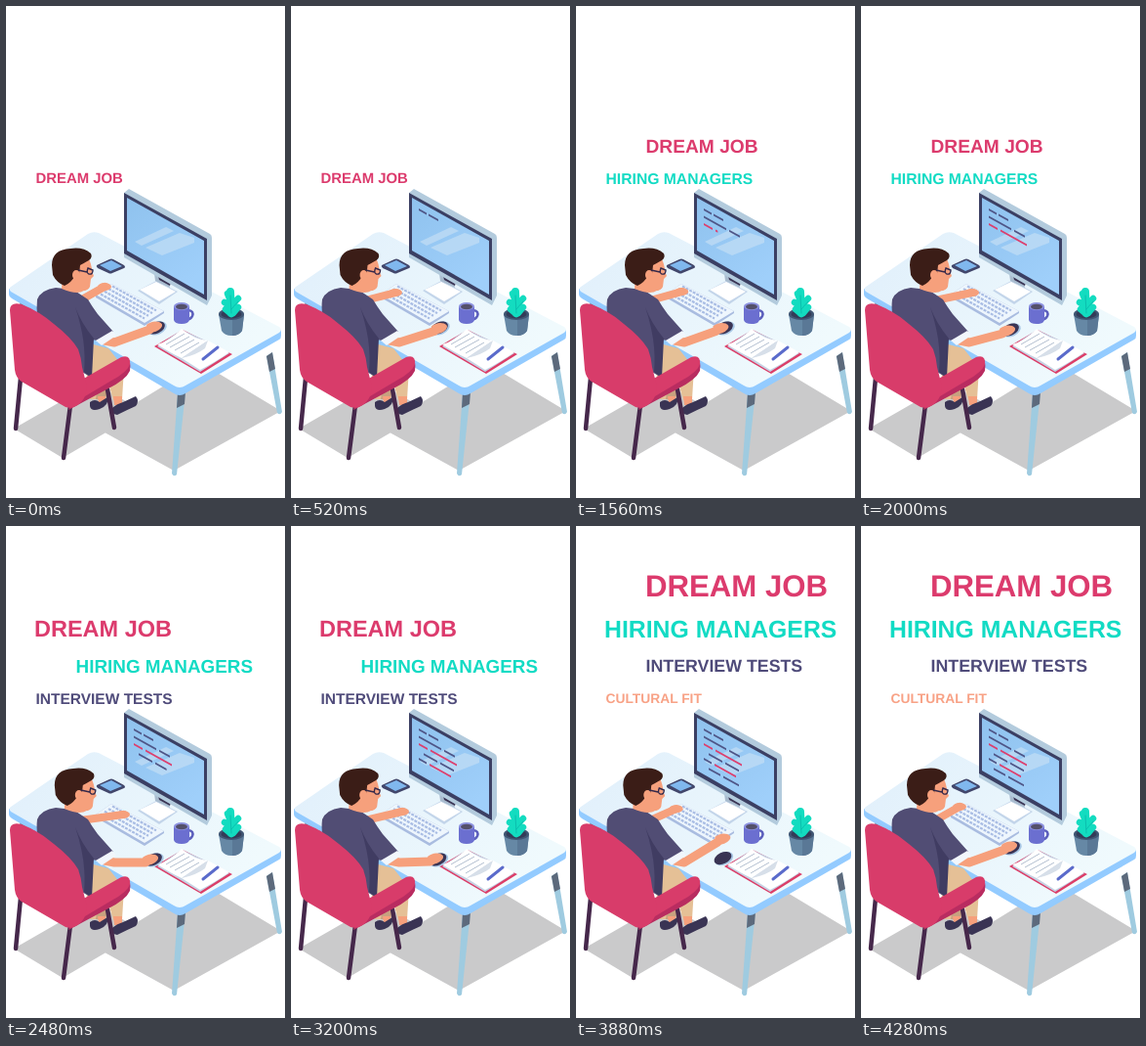
Write an HTML page that moves like this. It is 286 by 503 pixels and loops after 4.32 s.

```html
<!DOCTYPE html>
<html lang="en">
<head>
<meta charset="utf-8">
<title>Dream job</title>
<style>
html, body { margin: 0; width: 100%; height: 100%; overflow: hidden; background: #fff; }
svg { display: block; width: 100%; height: 100%; }
text { font: bold 15px "Liberation Sans", Arial, sans-serif; text-rendering: geometricPrecision; }
.skin { fill: #f6a07c; }
.limb { fill: none; stroke: #f6a07c; stroke-linecap: round; stroke-linejoin: round; }
.dark { fill: #3a3454; }
</style>
</head>
<body>
<svg viewBox="0 0 286 503">
  <defs>
    <linearGradient id="top" x2="1" y2=".5"><stop stop-color="#e0effb"/><stop offset="1" stop-color="#f0fafd"/></linearGradient>
    <linearGradient id="glass" x2=".6" y2="1"><stop stop-color="#8fc2ee"/><stop offset="1" stop-color="#9fcffa"/></linearGradient>
  </defs>

  <g id="labels"></g>

  <!-- shadows and desk -->
  <path fill="#cacacb" d="M8 432L58 462L140 414L90 385ZM92 431L172 475L282 414L200 365Z"/>
  <path fill="#9fcbe0" d="M267 358L273 354L283 415Q281 419 278 416ZM176 395L184 394L175 479Q172 482 170 478Z"/>
  <path fill="#5d6a7c" d="M267 358L273 354L276 371L270 374ZM176 395L184 394L183 407L175 411ZM14 302L21 306L22 318L16 314Z"/>
  <path fill="#93cbff" d="M3 289V295Q3 297 6 299L172 396Q178 400 184 396L280 341Q282 340 282 337V331Z"/>
  <path fill="url(#top)" d="M5 287L84 233Q89 230 95 232L280 328Q284 331 280 334L184 388Q178 392 172 388L5 292Q2 289 5 287Z"/>

  <!-- phone -->
  <path fill="#41466b" d="M93 265L106 259Q108 258 110 259L121 265Q123 267 121 268L109 273Q107 274 105 273L94 268Q92 266 93 265Z"/>
  <path fill="#80b8ee" d="M96 265L108 260L119 266L107 271Z"/>

  <!-- monitor -->
  <path fill="#c3d5ea" d="M135 291L154 281L176 292L157 305Z"/>
  <path fill="#fff" d="M137 290L154 282L174 292L157 302Z"/>
  <path fill="#a9bccf" d="M151 265L166 274L168 288L153 281Z"/>
  <path class="dark" d="M156 276L169 283L168 286L157 280Z"/>
  <path fill="#b3cbdd" d="M121 191L126 187L209 233Q211 234 211 237V296L206 306L121 257Z"/>
  <path fill="#3b3f63" d="M121 191L206 238V301L121 253Z"/>
  <path fill="url(#glass)" d="M124 196L203 240V295L124 250Z"/>
  <path fill="#c4def6" opacity=".7" d="M132 241L164 226L172 230L139 245ZM143 247L178 232L193 237V242L160 255Z"/>
  <g id="code" transform="matrix(1 .55 0 1 131 207)"></g>

  <!-- keyboard -->
  <path fill="#a9bce0" d="M92 295L108 284L162 312V314L142 327L92 298Z"/>
  <path fill="#eef6fd" d="M92 295L108 284L162 312L142 324Z"/>
  <g id="keys" fill="none" stroke="#a9bde4" stroke-width="2.2" stroke-dasharray="3 1.1"></g>

  <!-- mug -->
  <path fill="none" stroke="#5b5fbd" stroke-width="2.5" d="M187 311Q193 312 191 317Q189 321 185 320"/>
  <path fill="#6b6fd0" d="M172 307V321Q173 325 180 325Q187 325 188 321V307Z"/>
  <ellipse cx="180" cy="307" rx="8" ry="4" fill="#8d92e0"/>
  <ellipse cx="180" cy="307.5" rx="6" ry="2.8" fill="#54506a"/>

  <!-- cactus -->
  <path fill="#6688a5" d="M218 315L221 332Q224 337 231 337Q239 337 242 332L244 315Z"/>
  <path fill="#5a7896" d="M232 320L244 316L242 332Q239 337 232 337Z"/>
  <ellipse cx="231" cy="315" rx="13" ry="6" fill="#3f5573"/>
  <ellipse cx="231" cy="315" rx="10.5" ry="4.4" fill="#333c58"/>
  <g fill="none" stroke="#13dcc0" stroke-linecap="round">
    <path stroke-width="8" d="M231 314L230 292"/>
    <path stroke-width="6.5" d="M231 315L225 310M230 306L224 303M233 314L238 308M232 305L238 299M229 299L227 294"/>
    <path stroke="#0bbfae" stroke-width="1" d="M231 314L230 296M231 310L238 302"/>
  </g>

  <!-- notebook -->
  <path fill="#dc3d68" d="M152 348L181 331L232 356L200 376Z"/>
  <path fill="#c6d3e4" d="M155 348L180 331L207 343L229 355L199 374L179 362Z"/>
  <path fill="#fff" d="M155 346Q169 342 180 330Q193 341 207 342L180 360Q169 355 155 346ZM180 360Q195 356 207 342L229 354Q213 365 199 372Z"/>
  <path fill="#d7dfe9" d="M180 360L207 342L204 350Q195 357 180 360Z"/>
  <path fill="none" stroke="#b3bfd0" stroke-width="1" d="M164 346L183 335M168 349L188 338M173 352L193 341M179 355L198 344"/>
  <path stroke="#5a6bcb" stroke-width="3" stroke-linecap="round" d="M202 361L217 349"/>

  <!-- legs and shoes -->
  <path fill="#e5c096" d="M78 343L105 350L121 370L119 402L110 403L104 382L96 402L86 402Z"/>
  <path fill="#c7a280" d="M96 375L106 382L102 403L92 402Z"/>
  <path class="skin" d="M94 399H102V406H95ZM110 399H119V408H111Z"/>
  <path class="dark" d="M86 405Q91 401 96 405L104 400Q106 408 96 412Q87 415 86 409ZM109 411Q113 407 120 405L133 399Q137 404 133 409Q124 413 114 418Q107 417 109 411Z"/>

  <!-- far arm, mouse, near forearm -->
  <path id="farArm" class="limb" stroke-width="8"/>
  <g id="farHand"><ellipse class="skin" rx="7" ry="4"/></g>
  <g id="mouse"><ellipse cx="1" cy="1" rx="10" ry="6.3" transform="rotate(-25)" fill="#a9c8e6"/><ellipse class="dark" rx="9.5" ry="5.8" transform="rotate(-25)"/></g>
  <path id="nearArm" class="limb" stroke-width="9"/>
  <g id="nearHand"><path class="skin" d="M-9 -2Q-3 -7 4 -5Q9 -3 6 1Q2 6 -7 6Z"/></g>

  <!-- torso -->
  <path fill="#514d74" d="M32 300Q36 290 51 288L69 290L84 300Q88 307 94 315L110 333L93 342L88 341L88 380L50 358L37 338Q30 317 32 300Z"/>
  <path fill="#403c62" d="M71 308Q77 324 90 340L88 380L80 374Q83 343 71 308Z"/>
  <path fill="#f1f6fc" d="M92 342L109 332L113 337L98 347Z"/>

  <g id="head">
    <path class="skin" d="M59 275L80 282L81 291Q74 296 58 289ZM66 259L85 257Q89 264 89 271L91 276L88 279L87 287Q85 292 77 291L67 286Z"/>
    <path fill="#3b1d17" d="M48 265Q48 249 67 248Q80 246 88 253Q90 257 86 260Q79 264 77 265L76 274L72 275Q68 283 61 286Q53 283 49 275Z"/>
    <ellipse class="skin" cx="73" cy="275" rx="4" ry="5"/>
    <path fill="none" stroke="#35294a" stroke-width="1.4" d="M75 270L84 272M85 268L90 270Q90 275 86 274Q83 273 85 268Z"/>
  </g>

  <!-- chair -->
  <path fill="none" stroke="#46284b" stroke-width="4.5" stroke-linecap="round" d="M15 380L10 432M66 408L59 462M104 392L111 431"/>
  <path fill="#b92c60" d="M72 386L122 361Q129 362 127 373Q123 382 105 391L64 413Z"/>
  <path fill="#d83c6a" d="M76 383L118 359Q128 356 127 366Q125 374 108 383L76 402Z"/>
  <path fill="#d83c6a" d="M4 311Q4 302 16 305Q34 312 49 325Q67 339 74 351Q77 359 78 369L82 385Q84 398 77 405Q69 413 61 410L16 384Q10 380 9 372Z"/>
</svg>
<script>
const LOOP = 4320, NS = 'http://www.w3.org/2000/svg';
const $ = id => document.getElementById(id);

function add(parent, tag, attrs) {
  const el = document.createElementNS(NS, tag);
  for (const k in attrs) el.setAttribute(k, attrs[k]);
  return $(parent).appendChild(el);
}

// A new label enters below and pushes the earlier ones up a row.
const pushes = [0, 1000, 2120, 3240];
const rows = [176, 143, 105, 61], lefts = [30.5, 71.5, 29, 71];
const labels = [
  ['DREAM JOB', '#dc3b6d', [14.9, 19.2, 23.5, 31.2]],
  ['HIRING MANAGERS', '#12dbc4', [15.7, 18.9, 24.8]],
  ['INTERVIEW TESTS', '#4f4b7a', [15.5, 17.8]],
  ['CULTURAL FIT', '#f8a286', [13.8]]
].map(([word, fill, sizes]) => {
  const el = add('labels', 'text', { fill });
  el.textContent = word;
  return { el, sizes };
});

// Code lines: row, start, length, colour
const ink = '#4f5687', red = '#dc3f6e';
const lines = [
  [0, 0, 8, ink], [0, 10, 10, ink],
  [1, 0, 23, ink], [1, 26, 11, ink],
  [2, 0, 9, red], [2, 12, 27, red],
  [3, 5, 14, ink], [3, 22, 14, ink],
  [4, 0, 8, ink], [4, 11, 22, red],
  [5, 5, 12, ink], [5, 20, 16, ink]
].map(([row, x, len, fill]) => ({
  el: add('code', 'rect', { x, y: row * 7.5, height: 2, fill }),
  len, start: 60 + row * 650 + x * 14
}));

for (let i = 0; i < 4; i++) {
  const x = 97 + i * 4, y = 294.5 - i * 2.7;
  add('keys', 'path', { d: `M${x} ${y}l45 25` });
}

// Poses: time, x, y
const paths = {
  farHand: [[0, 101, 287], [500, 107, 293], [1040, 101, 295], [1500, 108, 292], [2000, 114, 293],
    [2480, 120, 295], [3200, 114, 292], [3520, 104, 291], [4280, 101, 287]],
  nearHand: [[0, 153, 328], [450, 153, 331], [800, 152, 315], [1200, 152, 316], [1650, 149, 331],
    [2000, 151, 332], [2480, 149, 341], [3200, 149, 340], [3460, 151, 319], [3800, 151, 319], [4160, 153, 328]],
  mouse: [[0, 154, 329], [450, 152, 329], [1650, 152, 329], [2000, 153, 331], [2480, 151, 341],
    [3800, 150, 341], [4160, 154, 329]],
  head: [[0, -1, 0], [700, 2, 0], [2000, 2, 0], [3600, 1, 0], [4280, -1, 0]]
};

function pose(keys, t) {
  const i = keys.findLastIndex(k => k[0] <= t);
  const a = keys[i], b = keys[i + 1];
  if (!b) return a.slice(1);
  const p = (1 - Math.cos(Math.PI * (t - a[0]) / (b[0] - a[0]))) / 2;
  return [1, 2].map(n => a[n] + (b[n] - a[n]) * p);
}

function draw(now) {
  const t = Math.floor(now % LOOP / 40) * 40;
  const stage = pushes.filter(p => p <= t).length - 1;
  labels.forEach(({ el, sizes }, i) => {
    const row = stage - i;
    el.style.display = row < 0 ? 'none' : '';
    if (row < 0) return;
    el.style.fontSize = sizes[row] + 'px';
    el.setAttribute('x', lefts[row]);
    el.setAttribute('y', rows[row] + sizes[row] * .36);
  });
  for (const { el, len, start } of lines)
    el.setAttribute('width', Math.max(0, Math.min(len, (t - start) / 14)));

  const at = {};
  for (const id in paths) {
    at[id] = pose(paths[id], t);
    $(id).setAttribute('transform', `translate(${at[id]})`);
  }
  $('farArm').setAttribute('d', `M76 301L${at.farHand}`);
  const [x, y] = at.nearHand;
  $('nearArm').setAttribute('d', `M101 342L111 344L${x - 6} ${y + 3}`);
  requestAnimationFrame(() => draw(performance.now()));
}
draw(performance.now());
</script>
</body>
</html>
```
